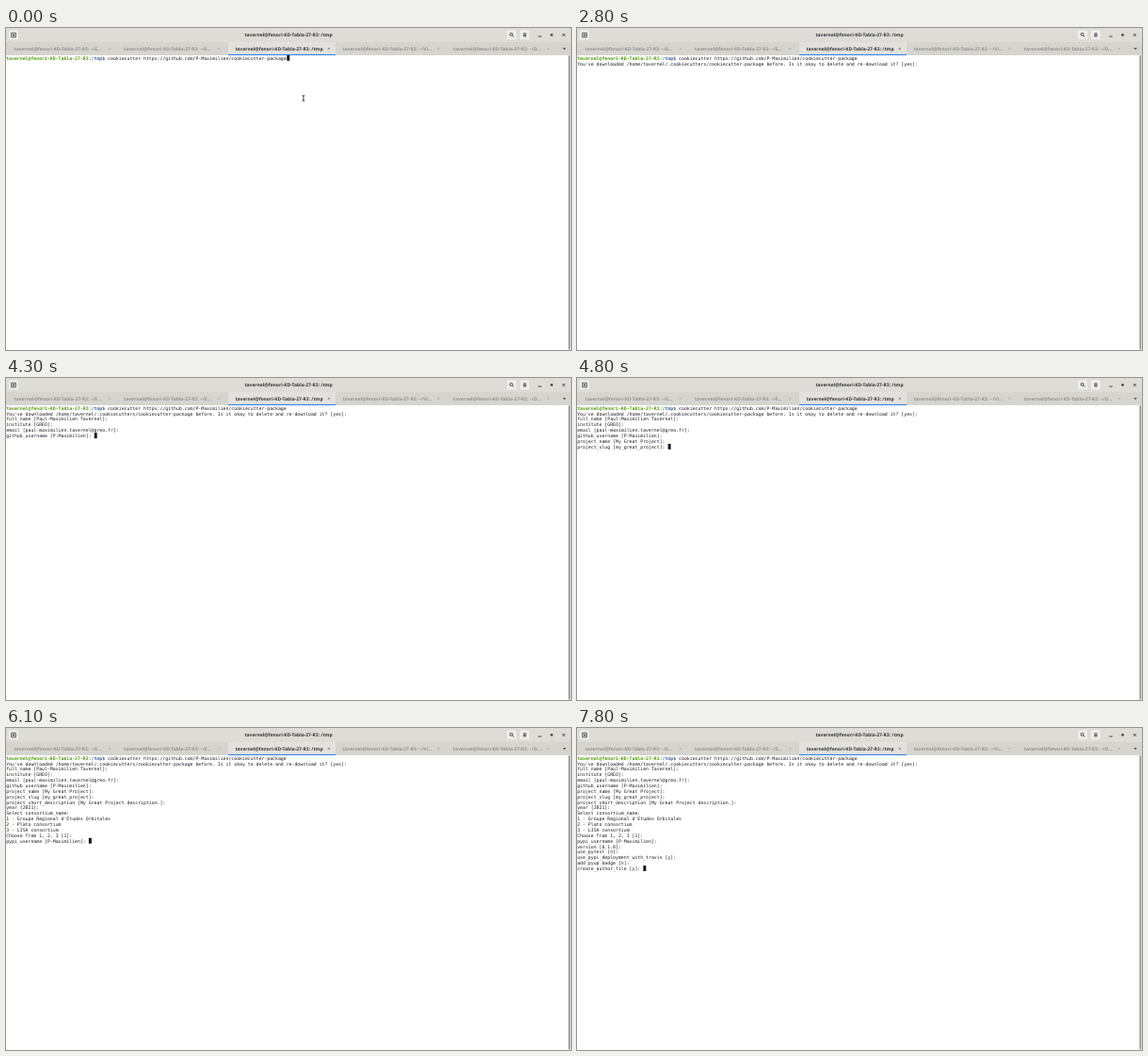
Write an HTML page that moves like this. It is 600 by 342 pixels and loops after 8 s.

```html
<!DOCTYPE html>
<html lang="en">
<head>
<meta charset="utf-8">
<title>Terminal session</title>
<style>
  html, body { margin: 0; width: 100%; height: 100%; overflow: hidden; background: #fff; }
  svg { display: block; width: 600px; height: 342px; }
  text { white-space: pre; text-rendering: geometricPrecision; }
  .ui { font: bold 4.97px "Noto Sans", "Open Sans", sans-serif; text-anchor: middle; fill: #303536; }
  .dim { fill: #929390; }
  .mono { font: 4.853px "DejaVu Sans Mono", monospace; fill: #1d1b26; }
  .user { font-weight: bold; fill: #4e9a06; }
  .path { font-weight: bold; fill: #3465a4; }
  .line { fill: none; stroke: #303536; stroke-width: .9; }
  .button { fill: #efeeeb; stroke: #d0cec9; stroke-width: .5; }
</style>
</head>
<body>
<svg id="stage" viewBox="0 0 600 342">
  <rect width="600" height="342" fill="#fff"/>
  <rect width="600" height="15" fill="#dedcd7"/>
  <rect y="15" width="600" height="13" fill="#d6d4cf"/>
  <rect y="28" width="600" height=".7" fill="#c8c5bf"/>
  <g id="bar"></g>
  <rect x="596.8" y="28.7" width="3.2" height="313.3" fill="#eeeeed"/>
  <rect x="597.4" y="29" width="1.8" height="312.4" rx=".9" fill="#979998"/>
  <g id="rows"></g>
  <rect id="cursor" width="3" height="5.9" fill="#171421"/>
  <path id="pointer" d="M314.6 71.6q1.3 0 1.3 .7q0-.7 1.3-.7M315.9 72v5M314.6 77.4q1.3 0 1.3-.7q0 .7 1.3 .7"
        fill="none" stroke="#111" stroke-width=".8"/>
</svg>
<script>
const LOOP = 8000, CELL = 2.922, PITCH = 5.86, LEFT = .2, TOP = 28.9, BASELINE = 4.85;
const user = "tavernel", handle = "P-Maximilien";
const login = user + "@fenori-KD-Tabla-27-R3";

const rows = [
  `${login}:/tmp$ cookiecutter https://github.com/${handle}/cookiecutter-package`,
  `You've downloaded /home/${user}/.cookiecutters/cookiecutter-package before. Is it okay to delete and re-download it? [yes]: `,
  "full_name [Paul-Maximilien Tavernel]: ",
  "institute [GREO]: ",
  `email [paul-maximilien.${user}@greo.fr]: `,
  `github_username [${handle}]: `,
  "project_name [My Great Project]: ",
  "project_slug [my_great_project]: ",
  "project_short_description [My Great Project description.]: ",
  "year [2021]: ",
  "Select consortium_name:",
  "1 - Groupe Regional d'Etudes Orbitales",
  "2 - Plato consortium",
  "3 - LISA consortium",
  "Choose from 1, 2, 3 [1]: ",
  `pypi_username [${handle}]: `,
  "version [0.1.0]: ",
  "use_pytest [n]: ",
  "use_pypi_deployment_with_travis [y]: ",
  "add_pyup_badge [n]: ",
  "create_author_file [y]: "
];

// time, rows printed, cursor: "end" of last row, "new" row, or "off"
const steps = [
  [0, 1, "end"], [400, 1, "off"], [800, 1, "new"],
  [900, 2, "end"], [1400, 2, "off"], [2000, 2, "end"],
  [2300, 2, "new"], [2800, 2, "off"], [2900, 3, "off"], [3400, 3, "end"],
  [3500, 4, "end"], [3900, 5, "end"], [4300, 6, "end"],
  [4600, 7, "end"], [4700, 7, "new"], [4800, 8, "end"],
  [5100, 9, "end"], [5400, 10, "end"], [5700, 15, "end"],
  [6100, 16, "end"], [6500, 17, "end"], [6800, 18, "end"],
  [7100, 19, "end"], [7500, 20, "end"], [7800, 21, "end"]
];
const POINTER_HIDES = 700;

const $ = id => document.getElementById(id);

function add(parent, tag, attrs, content = "") {
  const el = document.createElementNS("http://www.w3.org/2000/svg", tag);
  for (const key in attrs) el.setAttribute(key, attrs[key]);
  el.textContent = content;
  return parent.appendChild(el);
}

function drawBar(bar) {
  const label = (x, y, s, dim) => add(bar, "text", { x, y, class: dim ? "ui dim" : "ui" }, s);
  const line = (d, style = "") => add(bar, "path", { d, class: "line", style });
  const button = x => add(bar, "rect", { x, y: 1.8, width: 11, height: 11, rx: 1.6, class: "button" });

  label(300, 9.2, login + ": /tmp");
  [2.5, 531.5, 545.3].forEach(button);
  line("M5.7 5.2h4.6v4.6h-4.6zM8 6.2v2.6M6.7 7.5h2.6", "stroke-width:.8");
  add(bar, "circle", { cx: 536.5, cy: 6.8, r: 1.5, class: "line" });
  line("M537.6 7.9l1.7 1.7");
  line("M549.2 5.9h3.4M549.2 7.4h3.4M549.2 8.9h3.4");
  line("M565.2 9h3.4");
  add(bar, "rect", { x: 578.3, y: 6.2, width: 2.3, height: 2.3, fill: "#303536" });
  line("M590.9 6l2.8 2.8m0-2.8l-2.8 2.8");

  add(bar, "rect", { x: 236, y: 15, width: 114, height: 13, fill: "#e3e1dd" });
  add(bar, "rect", { x: 236, y: 27.9, width: 114, height: 1.1, fill: "#3584e4" });
  const tabs = [[55, "~/E..."], [171.5, "~/E..."], [290, "/tmp"], [404.8, "~/Vi..."], [521.5, "~/D..."]];
  tabs.forEach(([x, dir], i) => {
    const active = i === 2;
    label(x, 23.5, `${login}: ${dir}`, !active);
    const cx = 109.8 + 116.5 * i;
    line(`M${cx - 1} 20.8l2 2m0-2l-2 2`, `stroke-width:.6;stroke:${active ? "#555" : "#a5a5a1"}`);
  });
  add(bar, "path", { d: "M591.2 21.2h3.6l-1.8 1.9z", fill: "#303536" });
}

function drawRow(str, i) {
  const el = add($("rows"), "text", { x: LEFT, y: TOP + PITCH * i + BASELINE, class: "mono" });
  const span = (s, cls) => add(el, "tspan", cls ? { class: cls } : {}, s);
  if (i) {
    span(str);
  } else {
    span(login, "user");
    span(":");
    span("/tmp", "path");
    span(str.slice(login.length + 5));
  }
  return el;
}

drawBar($("bar"));
const lines = rows.map(drawRow);

function render(t) {
  const [, count, mode] = steps.findLast(s => s[0] <= t);
  lines.forEach((el, i) => el.setAttribute("visibility", i < count ? "visible" : "hidden"));

  const fresh = mode === "new";
  const col = fresh ? 0 : rows[count - 1].length;
  const row = fresh ? count : count - 1;
  const cursor = $("cursor");
  cursor.setAttribute("x", LEFT + CELL * col);
  cursor.setAttribute("y", TOP + PITCH * row);
  cursor.setAttribute("visibility", mode === "off" ? "hidden" : "visible");
  $("pointer").setAttribute("visibility", t < POINTER_HIDES ? "visible" : "hidden");
}

function tick() {
  render(performance.now() % LOOP);
  requestAnimationFrame(tick);
}
tick();
</script>
</body>
</html>
```
